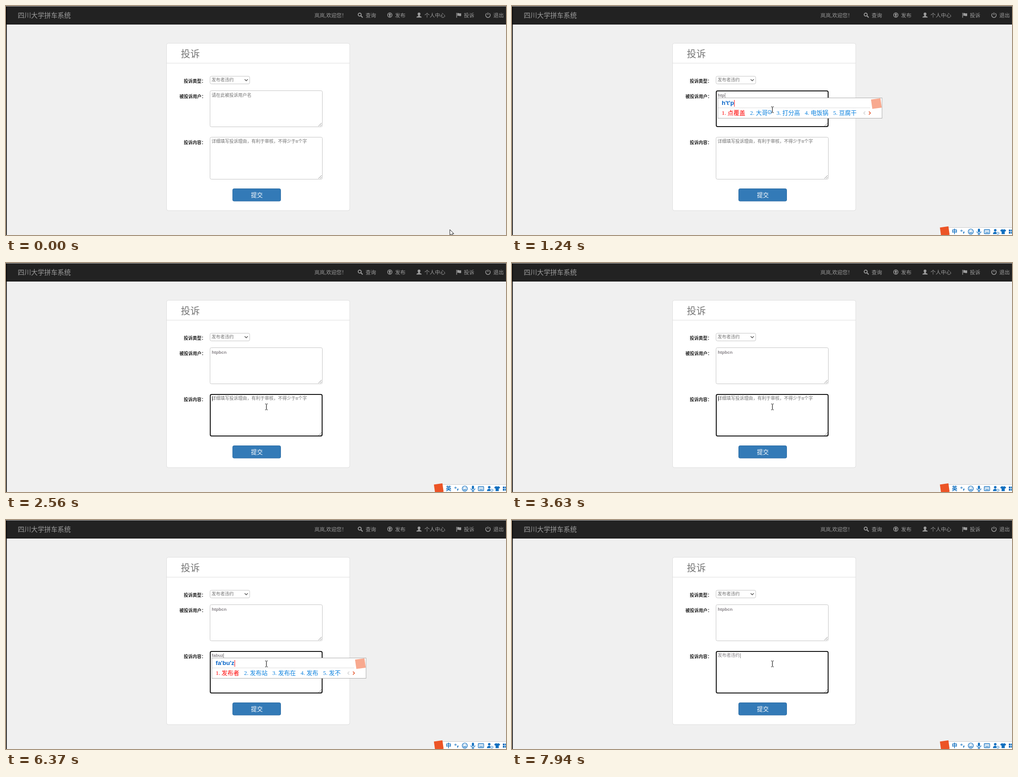
Recreate the animation shown at these times as an HTML page. Size 1104 by 507 pixels, loop 8 s.

```html
<!DOCTYPE html>
<html lang="zh-CN">
<head>
<meta charset="utf-8">
<title>投诉</title>
<style>
html, body { margin: 0; width: 100%; height: 100%; overflow: hidden; background: #f0f0f0; }
svg { display: block; width: 1104px; height: 507px; font-family: "Liberation Sans", "Noto Sans CJK SC", "Noto Sans CJK", sans-serif; }
text { white-space: pre; }
</style>
</head>
<body>
<svg viewBox="0 0 1104 507"><g id="page"></g><g id="live"></g></svg>
<script>
const LOOP = 8000, GRAY = '#9d9d9d', BLUE = '#1270c0', SMALL = 9.78;
const FAMILY = '"Liberation Sans", "Noto Sans CJK SC", "Noto Sans CJK", sans-serif';
const pen = document.createElement('canvas').getContext('2d');

const text = (x, y, size, str, fill, more = '') =>
  `<text x="${x}" y="${y}" font-size="${size}" fill="${fill}" ${more}>${str}</text>`;
const rect = (x, y, w, h, fill, stroke = 'none', r = 0, more = '') =>
  `<rect x="${x}" y="${y}" width="${w}" height="${h}" fill="${fill}" stroke="${stroke}" rx="${r}" ${more}/>`;
const line = (d, stroke, width = 1, fill = 'none') =>
  `<path d="${d}" stroke="${stroke}" stroke-width="${width}" fill="${fill}"/>`;
const shape = (d, fill) => `<path d="${d}" fill="${fill}"/>`;
const ring = (x, y, r, stroke, width) =>
  `<circle cx="${x}" cy="${y}" r="${r}" fill="none" stroke="${stroke}" stroke-width="${width}"/>`;
const at = (x, y, body) => `<g transform="translate(${x} ${y})">${body}</g>`;
const badge = (x, y, size, fill) =>
  rect(x - size / 2, y - size / 2, size, size, fill, 'none', 0, `transform="rotate(-8 ${x} ${y})"`);
const width = (str, size, weight) => {
  pen.font = `${weight} ${size}px ${FAMILY}`;
  return pen.measureText(str).width;
};
const weightOf = str => /[a-z]/.test(str) ? 700 : 500;

const fields = [
  { y: 187, h: 81, hint: '请在此被投诉用户名' },
  { y: 290, h: 94, hint: '详细填写投诉理由，有利于审核，不得少于8个字' }
];

// Each entry overrides the state from its time on; "@n" in a candidate is an icon n pixels wide.
const events = [
  { t: 0, focus: -1, done: ['', ''], pre: '', bar: '', caret: 1 },
  { t: 690, focus: 0 },
  { t: 770, bar: '中' },
  { t: 1090, pre: "h't", cands: '地方 对方 大夫 电费 富' },
  { t: 1240, pre: "h't'p", cands: '点覆盖 大哥@9 打分高 电饭锅 豆腐干' },
  { t: 1420, pre: "h't'p'b", cands: '的覆盖的 大风刮到 大幅高度 电饭锅的 对方感到了' },
  { t: 1490, pre: "h't'p'b'c", cands: '的覆盖第三 大风刮得 点覆盖 电饭锅 打分高' },
  { t: 1770, pre: "h't'p'b'c'n", cands: '的覆盖第三个 @36.5 小卢布森四个 小卢布森 点覆盖' },
  { t: 1920, cands: '的覆盖第三个 @29.5 小卢布森四个 小卢布森 点覆盖' },
  { t: 2100, done: ['htpbcn', ''], pre: '', bar: '英' },
  { t: 2560, focus: 1 },
  { t: 3100, caret: 0 }, { t: 3630, caret: 1 }, { t: 4110, caret: 0 }, { t: 4640, caret: 1 },
  { t: 4720, bar: '中' },
  { t: 5180, caret: 0 }, { t: 5740, caret: 1 },
  { t: 5820, pre: 'f', cands: '发 放 飞 非 分' },
  { t: 5980, pre: 'fa', cands: '发 法 罚 乏 阀' },
  { t: 6130, pre: "fa'b", cands: '发布 发表 发不 发吧 发' },
  { t: 6210, pre: "fa'bu", cands: '发布 发不 法布 发步 发' },
  { t: 6370, pre: "fa'bu'z", cands: '发布者 发布站 发布在 发布 发不' },
  { t: 6440, pre: "fa'bu'zh", cands: '发布者 发布站 发布 发不 法布' },
  { t: 6520, pre: "fa'bu'zhe", cands: '发布者 发布 发不 法布 发步' },
  { t: 6750, done: ['htpbcn', '发布者'], pre: '' },
  { t: 6990, pre: 'w', cands: '我 我们 无 问@6 外面' },
  { t: 7070, pre: 'wei', cands: '为 位 喂 未 微' },
  { t: 7300, pre: "wei'y", cands: '违约 唯一 威严 未有 位移' },
  { t: 7385, pre: "wei'yu", cands: '位于 未予 喂鱼 违约 谓语' },
  { t: 7470, pre: "wei'yue", cands: '违约 未约 位 为 未' },
  { t: 7940, done: ['htpbcn', '发布者违约'], pre: '' }
];

function drawPage() {
  const nav = [[794, '查询'], [859, '发布'], [924, '个人中心'], [1011, '投诉'], [1076, '退出']];
  const labels = [[392.5, 169.7, '投诉类型：'], [383, 204, '被投诉用户：'], [392.5, 306, '投诉内容：']];
  return rect(0, 0, 1104, 507, '#f0f0f0') + rect(0, 0, 1104, 41, '#222') +
    rect(0, 0, 1104, 1, '#bbb') + rect(0, 40, 1104, 1, '#111') + rect(0, 1, 1.6, 506, '#000') +
    text(26, 26, 14.65, '四川大学拼车系统', GRAY) +
    text(681, 25.2, 11.4, '岚岚,欢迎您！', GRAY) +
    nav.map(([x, s]) => text(x, 25.2, 11.5, s, GRAY)).join('') +
    ring(781, 19, 3.4, GRAY, 1.8) + line('M783.5 21.5l4 4', GRAY, 2.2) +
    ring(847.5, 20, 4.8, GRAY, 1.5) + shape('M847.5 16.2l3.2 3.6h-2v3.6h-2.4v-3.6h-2z', GRAY) +
    shape('M912 14.5c4 0 3.6 4.500 1.600 6.500v1l4 2v1.500h-11.200v-1.500l4-2v-1c-2-2-2.400-6.500 1.600-6.500z', GRAY) +
    line('M995 15v11', GRAY, 1.3) + shape('M996.500 16c3-1.500 4 1.500 8.500 0v6c-4 1.500-5.500-1.500-8.500 0z', GRAY) +
    line('M1061.500 16.200a5 5 0 1 0 5.400 0M1064.200 14.500v5.500', GRAY, 1.5) +
    rect(354.500, 82.500, 404.500, 370.500, '#fff', '#ddd', 4) + line('M354 126.500h405', '#ddd') +
    text(386, 112.800, 21, '投诉', '#777', 'font-weight="300"') +
    labels.map(([x, y, s]) => text(x, y, SMALL, s, '#222', 'font-weight="700"')).join('') +
    rect(450.500, 155.500, 87.500, 17, '#fff', '#c4c4c4', 3) +
    text(454, 166.800, SMALL, '发布者违约', '#777', 'font-weight="500"') +
    line('M527 162.300l3.400 3.400 3.400-3.400', '#555', 1.6) +
    rect(500.500, 404.500, 106, 27.500, '#337ab7', '#2e6da4', 3) +
    text(541, 422.800, 12.900, '提交', '#fff');
}

function drawField(f, i, s) {
  const on = s.focus === i, base = f.y + (i ? 13.200 : 14), top = f.y + 5, bottom = f.y + f.h;
  const pre = on ? s.pre.replaceAll("'", '') : '', done = s.done[i];
  const mid = 454.300 + width(done, SMALL, weightOf(done));
  const end = mid + width(pre, SMALL, 700);
  let out = on ? rect(451, f.y + 1, 247, f.h - 2, '#fff', '#111', 3, 'stroke-width="2"')
               : rect(450.500, f.y + .5, 248, f.h - 1, '#fff', '#c4c4c4', 3);
  out += line(`M690 ${bottom - 2}l7-7M694 ${bottom - 2}l3-3`, '#777', .9);
  out += done || pre
    ? text(454.300, base, SMALL, done, '#858085', `font-weight="${weightOf(done)}"`) +
      text(mid, base, SMALL, pre, '#858085', 'font-weight="700"')
    : text(454, base, SMALL, f.hint, '#707070', 'font-weight="500"');
  if (on && s.caret) out += rect(Math.round(end + .7), top, 1, 11, pre || done ? '#888' : '#333');
  return out;
}

function cloudIcon(x, w) {
  return w > 20
    ? at(x - 9, 236.500, line('M-4 4a3.300 3.300 0 0 1 0-6.500a4.500 4.500 0 0 1 8.200 0a3.300 3.300 0 0 1 0 6.500z', '#1684dc', 1.2) + ring(0, .8, 1.8, '#1684dc', 1))
    : at(x - w / 2, 235, ring(0, 0, Math.min(4, w / 2), '#1684dc', 1) + line('M-2 0l1.500 1.700 2.800-3', '#1684dc'));
}

function drawPopup(s) {
  if (!s.pre) return '';
  let x = 463, row = '';
  s.cands.split(' ').forEach((item, i) => {
    const [word, icon = 0] = item.split('@'), fill = i ? '#0a80de' : '#f00';
    if (word) {
      row += text(x, 241.300, 13, i + 1 + '.', fill, 'font-family="Liberation Serif, serif"') +
        text(x + 13, 241.300, 13, word, fill);
      x += 13 + 13 * word.length;
    }
    x += +icon;
    if (+icon) row += cloudIcon(x, +icon);
    x += 10.500;
  });
  const end = x - 10.500, right = end + 56;
  const caret = 463.500 + width(s.pre, 13.330, 700);
  const shift = s.done[s.focus] ? 30 : 0;
  return at(shift, s.focus ? 102 : 0,
    rect(454.500, 203.500, right - 454.500, 45, '#fff', '#aaa') +
    line(`M455 225.500H${right - 26}`, '#ddd') + row +
    text(463, 219, 13.330, s.pre, '#0664c8', 'font-weight="700"') +
    rect(caret, 208, 1, 15, '#f00') +
    line(`M${end + 19} 233.500l-3.500 3.500 3.500 3.500`, '#ccc', 1.2) +
    line(`M${end + 27} 233.500l3.500 3.500-3.500 3.500`, '#e4572e', 1.7) +
    badge(right - 12.500, 216, 21, '#f8a98f'));
}

function drawBar(mode) {
  if (!mode) return '';
  const keys = [0, 1, 2, 3].map(i => rect(1044.200 + i * 2.500, 497.500, 1.300, 1.300, BLUE)).join('');
  const grid = [0, 1, 2, 3].map(i => rect(1097 + i % 2 * 5, 495 + (i >> 1) * 5, 4, 4, BLUE)).join('');
  return rect(960, 490.500, 146, 18, '#fff', '#ccc') + badge(955.500, 498.500, 19, '#ec5426') +
    text(971.200, 504, 12, mode, BLUE, 'font-weight="700"') +
    ring(992.500, 497.500, 1.500, BLUE, 1.2) + line('M997.500 499.500q1 2-1 4', BLUE, 2) +
    ring(1013, 499.500, 5.600, BLUE, 1.4) + line('M1010 500.500q3 4 6 0M1011 497v1.500M1015 497v1.500', BLUE, 1.3) +
    rect(1028.700, 493, 4.600, 8, BLUE, 'none', 2.300) + line('M1026.500 499q0 4 4.500 4t4.500-4M1031 503v3M1028.500 505.500h5', BLUE, 1.3) +
    rect(1042.700, 495, 12, 9, 'none', BLUE, 1, 'stroke-width="1.300"') + keys + line('M1045 501.500h8', BLUE, 1.3) +
    `<circle cx="1067" cy="496.500" r="2.800" fill="${BLUE}"/>` + shape('M1062 505q0-5 5-5h2v5z', BLUE) +
    rect(1069.500, 501, 6, 4, '#fff', BLUE, 2) +
    shape('M1082 494q3 2 5 0l4 2.500-1.500 3-1.500-.5v6h-7v-6l-1.500.5-1.500-3z', BLUE) + grid;
}

function pointer(t) {
  const go = (x, y, X, Y, k) => [x + (X - x) * k, y + (Y - y) * k];
  const step = (from, n, gap) => Math.max(0, Math.min(1, (Math.floor((t - from) / gap) + 1) / n));
  if (t < 1920) {
    const k = step(70, 8, 77.800);
    return go(980, 495, 575, 229.500, k * k * (3 - 2 * k));
  }
  return go(571, 263, 575, 318.500, step(2160, 5, 62.500));
}

function drawPointer(t) {
  const [x, y] = pointer(t);
  const inside = fields.some(f => x > 450 && x < 699 && y > f.y && y < f.y + f.h);
  const beam = inside && (t < 1920 || t >= 2160);
  return at(x, y, beam
    ? line('M-3-6.500h2.300M.7-6.500h2.300M0-6v12M-3 6.500h2.300M.7 6.500h2.300', '#111', 1.2)
    : line('M0 0v12.500l2.800-2.600 2 5 2.300-1-2.100-4.700h3.900z', '#111', 1, '#fff'));
}

const live = document.getElementById('live');
document.getElementById('page').innerHTML = drawPage();
const start = performance.now();

function frame() {
  const t = (performance.now() - start) % LOOP;
  const s = Object.assign({}, ...events.filter(e => e.t <= t));
  live.innerHTML = fields.map((f, i) => drawField(f, i, s)).join('') +
    drawBar(s.bar) + drawPopup(s) + drawPointer(t);
  requestAnimationFrame(frame);
}
frame();
</script>
</body>
</html>
```
